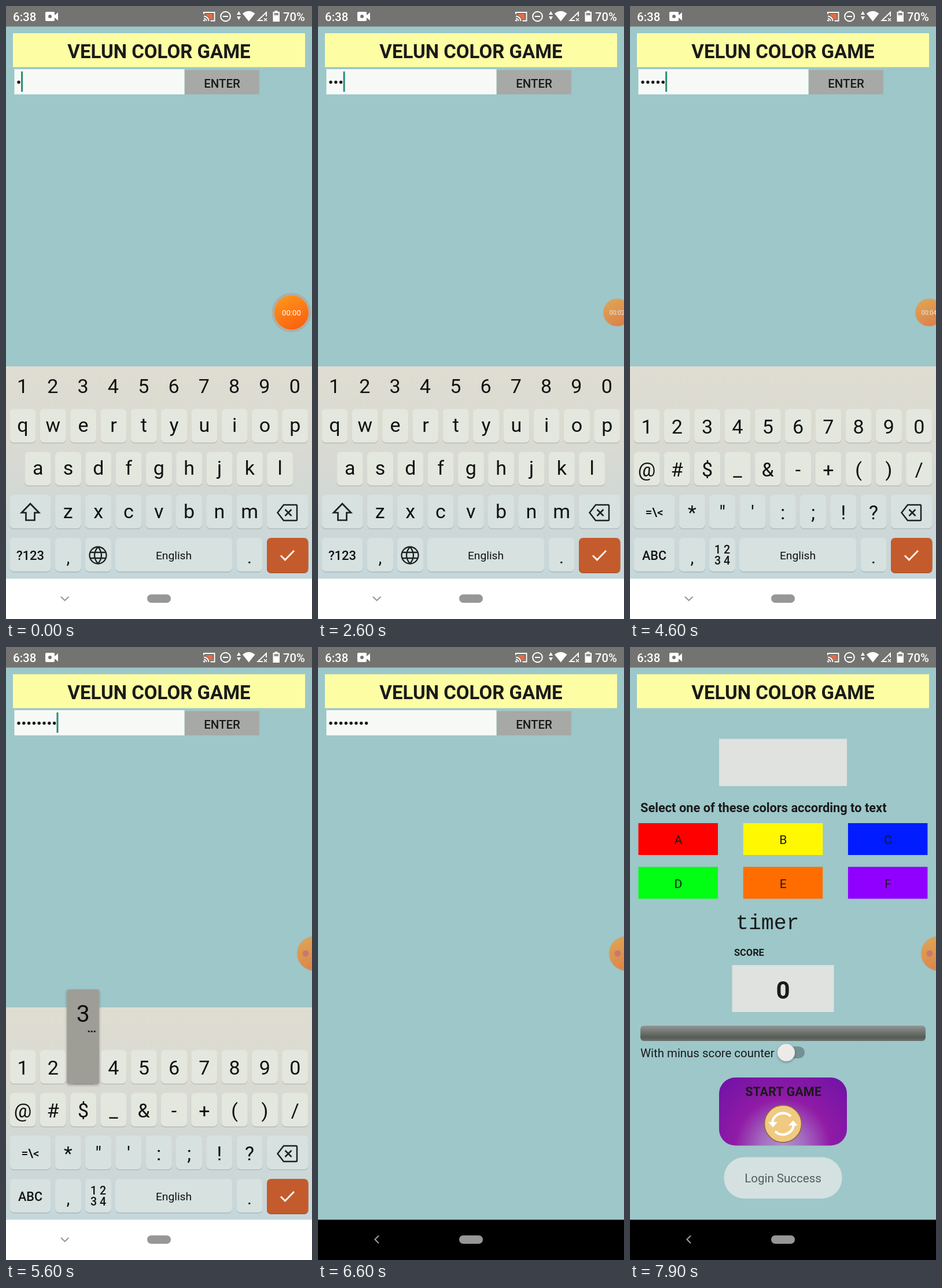
An HTML page that plays this animation: 529x1058 px, repeating every 8 s.

```html
<!DOCTYPE html>
<html lang="en">
<head>
<meta charset="utf-8">
<title>Color game</title>
<style>
html, body { margin: 0; width: 100%; height: 100%; overflow: hidden; background: #9dc7c9; }
svg { display: block; width: 529px; height: 1058px; }
text { font-family: Roboto, sans-serif; fill: #1a1a1a; text-anchor: middle; white-space: pre; }
.l { text-anchor: start; }
.m { font-weight: 500; }
.b { font-weight: 700; }
.k { fill: #111; }
.w { fill: #fff; }
.o { fill: none; stroke: #1d2122; stroke-width: 2.7; }
</style>
</head>
<body>
<svg id="stage" viewBox="0 0 529 1058">
  <defs>
    <linearGradient id="board" x2="0" y2="1">
      <stop stop-color="#dfddd2"/><stop offset=".35" stop-color="#dadad1"/><stop offset=".7" stop-color="#cfd7d6"/><stop offset="1" stop-color="#c5d7db"/>
    </linearGradient>
    <linearGradient id="bar" x2="0" y2="1">
      <stop stop-color="#939693"/><stop offset=".75" stop-color="#565b55"/><stop offset="1" stop-color="#6d726d"/>
    </linearGradient>
    <radialGradient id="glow" gradientUnits="userSpaceOnUse" cx="264" cy="862" r="150">
      <stop stop-color="#ad93cf"/><stop offset=".25" stop-color="#a36cbf"/><stop offset=".55" stop-color="#901ba6"/><stop offset="1" stop-color="#7313a6"/>
    </radialGradient>
    <linearGradient id="ball" x2=".5" y2="1">
      <stop stop-color="#ff9a1c"/><stop offset="1" stop-color="#fb6410"/>
    </linearGradient>
    <filter id="soft" x="-20%" y="-20%" width="140%" height="140%">
      <feDropShadow dx="0" dy="2" stdDeviation="2" flood-opacity=".3"/>
    </filter>
  </defs>
  <rect width="529" height="1058" fill="#9dc7c9"/>
  <rect width="529" height="35.5" fill="#737371"/>
  <g id="status">
    <text x="12" y="25.5" font-size="20.5" class="l m w">6:38</text>
    <path class="w" d="M70 10h12q2 0 2 2v4l6-5v14l-6-5v4q0 2-2 2H70q-2 0-2-2V12q0-2 2-2z"/>
    <circle cx="76" cy="18" r="3" fill="#737371"/>
    <path d="M346 14h11v9h-5q-1-5-6-7z" fill="#f0693c"/>
    <path d="M342 14v-3h18.500v14.500h-7M342 17.500a8.500 8.500 0 0 1 8.500 8.500M342 21.500a4.500 4.500 0 0 1 4.500 4.500" fill="none" stroke="#fff" stroke-width="1.9"/>
    <circle cx="342.500" cy="25" r="1.600" class="w"/>
    <circle cx="379.500" cy="18" r="8.300" fill="none" stroke="#fff" stroke-width="2"/>
    <path d="M375 18h9" stroke="#fff" stroke-width="2"/>
    <path class="w" d="M399 15l3.500-6 3.500 6zM399 18h7l-3.500 6zM409 13q10.500-8.500 21.500 0L419.700 26.500z"/>
    <path d="M444 25h-8.500L450 11v7" fill="none" stroke="#fff" stroke-width="1.900"/>
    <path d="M446 21l5 5m0-5l-5 5" stroke="#fff" stroke-width="1.500"/>
    <path class="w" d="M464.500 8h5v2h3.500v17h-11.500V10h3z"/>
    <path d="M463.500 12h7.500v4h-7.500z" fill="#8f8f8d"/>
    <text x="479" y="25.500" font-size="20.200" class="l m w">70%</text>
  </g>
  <rect x="12" y="47" width="505" height="58.500" fill="#fdfea3"/>
  <text x="264.500" y="89.500" font-size="33" class="b">VELUN COLOR GAME</text>
  <g id="login">
    <rect x="14.500" y="109" width="294" height="43.500" fill="#f7f9f6"/>
    <g id="dots"></g>
    <rect id="caret" y="113" width="3" height="35" fill="#2a8d79"/>
    <rect id="enter" x="309" y="110.500" width="129" height="42" fill="#a7a9a6"/>
    <text x="373.500" y="141" font-size="20.500" class="m">ENTER</text>
  </g>
  <g id="game"></g>
  <g id="toast">
    <rect x="162.500" y="880.500" width="204" height="71.500" rx="35" fill="#d4e1e0"/>
    <text x="264.500" y="924" font-size="20.500" style="fill:#525b5b">Login Success</text>
  </g>
  <g id="timer">
    <circle id="halo" fill="#b3a79d" opacity=".75"/>
    <circle id="disc" fill="url(#ball)"/>
    <text id="clock" class="w"></text>
    <circle id="rec" r="5.500" fill="#d9574a"/>
  </g>
  <g id="keys">
    <rect y="622" width="529" height="367" fill="url(#board)"/>
    <g id="letters"></g>
    <g id="symbols"></g>
    <g id="common"></g>
    <rect id="press" y="843" height="59" rx="7" fill="#8da0a4" opacity=".25"/>
    <g id="popup" filter="url(#soft)">
      <rect y="591" width="56" height="163" rx="4" fill="#9e9d96"/>
      <text id="big" x="28" y="647" font-size="41" class="k"></text>
      <path d="M36.500 663.500h3m2 0h3m2 0h3" stroke="#111" stroke-width="2.400"/>
    </g>
  </g>
  <rect id="nav" y="988.500" width="529" height="70"/>
  <rect x="244" y="1015.500" width="41" height="14.500" rx="7.200" fill="#979797"/>
  <path id="chev" fill="none" stroke="#999" stroke-width="2.200"/>
</svg>
<script>
const $ = id => document.getElementById(id);
const fill = (id, html) => { $(id).innerHTML = html; };
const set = (id, attrs) => { for (const k in attrs) $(id).setAttribute(k, attrs[k]); };
const show = (id, on) => { $(id).style.display = on ? '' : 'none'; };
const ramp = (t, a, b) => Math.min(1, Math.max(0, (t - a) / (b - a)));
const ease = u => u * u * (3 - 2 * u);

const esc = s => s.replace(/&/g, '&amp;').replace(/</g, '&lt;');
const label = (s, x, y, size, cls = 'k') =>
  `<text x="${x}" y="${y}" font-size="${size}" class="${cls}">${esc(s)}</text>`;
const box = (x, y, w, h, color, rx = 0) =>
  `<rect x="${x}" y="${y}" width="${w}" height="${h}" rx="${rx}" fill="${color}"/>`;
const key = (x, y, w = 45) =>
  box(x, y + 1.5, w, 58, 'rgba(120,135,135,.38)', 7) +
  box(x, y, w, 58, 'rgb(222,227,221)', 7) +
  box(x, y, w, 58, `rgba(${y < 800 ? '233,235,224' : '208,224,227'},.5)`, 7);

const STEP = 52.3, ROW = 74;
function keyRow(chars, cx, top, base) {
  return [...chars].map((c, i) => {
    const x = cx + i * STEP;
    return key(x - 22.5, top) + label(c, x, base, 34);
  }).join('');
}

fill('letters',
  [...'1234567890'].map((c, i) => label(c, 28.5 + i * STEP, 668, 34)).join('') +
  keyRow('qwertyuiop', 29, 695.5, 735) +
  keyRow('asdfghjkl', 55.2, 769.5, 809) +
  keyRow('zxcvbnm', 107.3, 843.5, 883.5) +
  key(6.5, 843.5, 71) + key(6.5, 918, 71) + key(137, 918) +
  '<path class="o" d="M42 859l15 15.500h-7.500v13h-15v-13H27z"/>' +
  label('?123', 42, 956, 22, 'k m') +
  '<path class="o" style="stroke-width:2.300" d="M144.500 948a14.500 14.500 0 1 0 29 0a14.500 14.500 0 1 0-29 0M146 943h26M146 953h26M159 933.500q-12 14.500 0 29q12-14.500 0-29"/>');

fill('symbols',
  keyRow('1234567890', 29, 695.5, 738) +
  keyRow('@#$_&-+()/', 29, 769.5, 812) +
  keyRow('*"\':;!?', 107.3, 843.5, 886) +
  key(6.5, 843.5, 71) + key(6.5, 918, 71) + key(137, 918) +
  label('=\\<', 42, 881, 21, 'k m') +
  label('ABC', 42, 956, 21.5, 'k m') +
  label('1 2', 159.5, 945, 19.5, 'k m') +
  label('3 4', 159.5, 964, 19.5, 'k m'));

fill('common',
  key(451, 843.5, 71.5) + key(85, 918) + key(189, 918, 202) + key(398.5, 918) +
  '<path class="o" style="stroke-width:2.500" d="M480 861h21.500q1.500 0 1.500 1.500v24q0 1.500-1.500 1.500H480l-10.500-13.500zM482.500 869l11 11m0-11l-11 11"/>' +
  label(',', 107.500, 962, 30) + label('.', 421, 962, 30) + label('English', 290, 955, 19.2) +
  box(451, 919.5, 71.5, 59.5, '#a8battleship'.slice(0, 0) || '#a9522c', 7) +
  box(451, 918, 71.5, 59.5, '#c45b2c', 7) +
  '<path d="M475 948.500l7.500 7.500 15.500-16" fill="none" stroke="#fff" stroke-width="2.800"/>');

const tiles = ['#ff0000', '#fff800', '#001cff', '#00ff12', '#ff6d00', '#9000ff'].map((c, i) => {
  const x = 14.5 + (i % 3) * 181.2, y = i < 3 ? 304 : 379.5;
  return box(x, y, 137.5, 55, c) + label('ABCDEF'[i], x + 69, y + 36, 21, '');
}).join('');
const arrow = '<path d="M246 820a19 19 0 0 1 32-10" fill="none" stroke="#fff" stroke-width="4.500"/><path class="w" d="M239 820l8 9 8-9z"/>';

fill('game',
  box(154, 158.5, 221, 81.5, '#dfe2df') +
  label('Select one of these colors according to text', 18, 285, 21.8, 'l b') + tiles +
  '<text x="183" y="487" font-size="36.500" class="l" style="font-family:\'Liberation Mono\',monospace">timer</text>' +
  label('SCORE', 180, 533, 16.4, 'l b') +
  box(176.5, 549, 176, 81, '#dfe2df') + label('0', 264.5, 607, 42, 'b') +
  box(18, 653.5, 493, 26.5, 'url(#bar)', 6) +
  label('With minus score counter', 18, 708, 20.4, 'l') +
  box(259, 689.5, 43, 20.5, '#739192', 10.2) +
  '<circle cx="270" cy="700" r="15" fill="#ecebe8" filter="url(#soft)"/>' +
  box(154, 743, 221, 117.5, 'url(#glow)', 28) +
  label('START GAME', 265, 775, 21.6, 'b') +
  '<circle cx="264.500" cy="823" r="32" fill="#efca80" stroke="#8f6836" stroke-width="1.500"/>' +
  arrow + `<g transform="rotate(180 264.500 823)">${arrow}</g>`);

fill('dots', Array.from({ length: 8 }, (_, i) =>
  `<circle cx="${22 + 8.8 * i}" cy="131.500" r="2.700" fill="#1a1a1a"/>`).join(''));

// [time, characters in the field]
const edits = [[0, 1], [300, 2], [1400, 1], [2000, 2], [2200, 3], [2800, 4], [4400, 5], [4900, 6], [5200, 7], [5500, 8]];
// [from, to, character, key centre, row]
const taps = [
  [200, 400, 'a', 55.2, 1], [1900, 2100, 'a', 55.2, 1], [2200, 2400, 's', 107.5, 1], [2800, 2900, 's', 107.5, 1],
  [4300, 4500, '@', 29, 1], [4800, 5000, '1', 29, 0], [5100, 5300, '2', 81.3, 0], [5500, 5700, '3', 133.2, 0]];

function drawTimer(t) {
  const shrink = ease(ramp(t, 1900, 2300)), hide = ease(ramp(t, 4700, 5100));
  const cx = 493.5 + 23.5 * shrink + 16 * hide;
  const r = 29.5 - 6 * shrink + 6 * hide;
  const rec = hide > .5;
  const s = Math.max(0, Math.floor((t - 400) / 1000));
  set('halo', { cx, cy: 529, r: r + 4.5 - 3.5 * shrink });
  set('disc', { cx, cy: 529, r });
  set('clock', { x: cx, y: 533.5 - shrink * .5, 'font-size': 13.2 - 2.4 * shrink });
  $('clock').textContent = '00:0' + s;
  set('rec', { cx: cx - 15, cy: 529 });
  set('timer', { opacity: 1 - .32 * shrink });
  show('clock', !rec);
  show('rec', rec);
}

function draw(t) {
  const [last, count] = edits.filter(e => e[0] <= t).pop();
  [...$('dots').children].forEach((d, i) => { d.style.display = i < count ? '' : 'none'; });
  set('caret', { x: 17.3 + 8.77 * count });
  show('caret', t < 6100 && Math.floor((t - last) / 500) % 2 === 0);

  const sym = t >= 3500;
  show('letters', !sym);
  show('symbols', sym);
  const back = t >= 1100 && t < 1400, mode = t >= 3300 && t < 3500, done = t >= 6100 && t < 6200;
  show('press', back || mode || done);
  set('press', { x: mode ? 6.5 : 451, y: back ? 843.5 : 918, width: 71.5 });

  const tap = taps.find(p => t >= p[0] && t < p[1]);
  show('popup', tap);
  if (tap) {
    set('popup', { transform: `translate(${tap[3] - 28} ${tap[4] * ROW})` });
    $('big').textContent = tap[2];
  }

  const drop = ramp(t, 6100, 6500);
  set('keys', { transform: `translate(0 ${367 * drop * drop})` });
  show('keys', drop < 1);
  const dark = t >= 6400;
  set('nav', { fill: dark ? '#000' : '#fff' });
  set('chev', { d: dark ? 'M105 1016l-6.500 6.500 6.500 6.500' : 'M95 1019.500l6.700 6.500 6.700-6.500' });

  const playing = t >= 7400;
  set('enter', { fill: t >= 7200 ? '#bfc1be' : '#a7a9a6' });
  show('login', !playing);
  show('game', playing);
  set('toast', { opacity: ramp(t, 7400, 7800) });
  drawTimer(t);
}

const start = performance.now();
function tick(now) {
  const t = Math.max(0, now - start) % 8000;
  draw(Math.floor(t / 100) * 100);
  requestAnimationFrame(tick);
}
draw(0);
requestAnimationFrame(tick);
</script>
</body>
</html>
```
